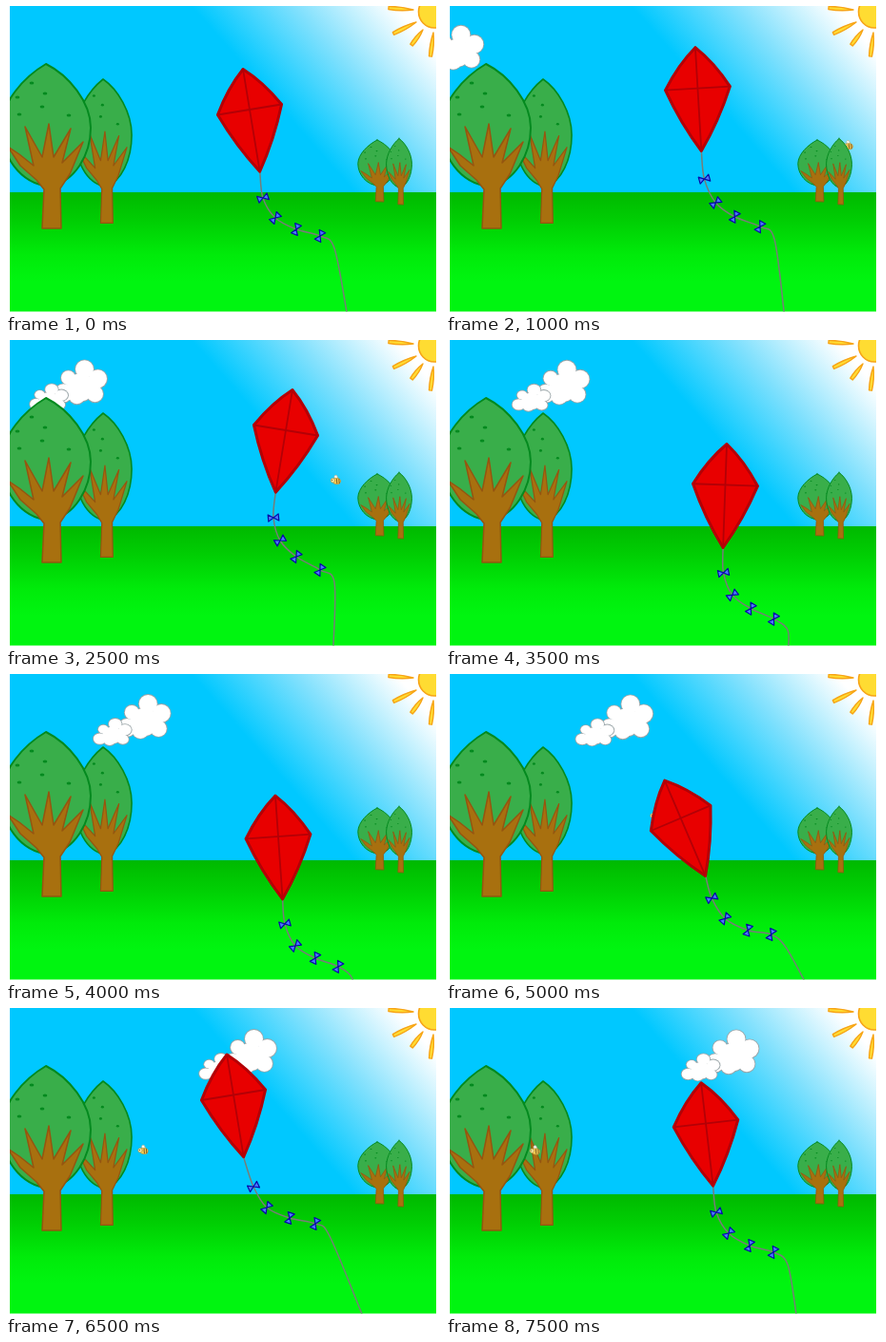
These frames come from a looping animation (456 px wide and 322 px high, 8 s). An HTML page with a canvas:

```html
<!DOCTYPE html>
<html lang="en">
<head>
<meta charset="utf-8">
<title>Kite</title>
<style>
html, body { margin: 0; width: 100%; height: 100%; overflow: hidden; background: #fff; }
canvas { display: block; }
</style>
</head>
<body>
<canvas id="stage" width="456" height="322"></canvas>
<script>
const ctx = document.getElementById('stage').getContext('2d');
const LOOP = 8000, STEP = 500, TAU = Math.PI * 2;

// time, centre x, centre y, tilt in degrees, four bows (x, y), x of the string end
const POSES = [
  [0, 256, 109, -9.3, 270, 202, 283, 223, 305, 235, 330, 242, 358],
  [1.5, 270.5, 80, 0, 273, 176, 284, 202, 303, 218, 330, 230, 353],
  [2.5, 294, 95, 9.3, 281, 187, 288, 211, 305, 228, 330, 242, 344],
  [4, 286, 171, -4, 293, 263, 304, 286, 325, 299, 349, 308, 366],
  [5.5, 230.4, 133.5, -28.5, 271, 216, 286, 237, 311, 249, 336, 252, 379],
  [6.5, 239, 91.5, -9.3, 260, 188, 274, 210, 298, 221, 325, 227, 374],
  [7.5, 273, 121.5, -6.6, 284, 215, 297, 237, 319, 250, 344, 257, 368]
];

// smooth curve through the poses
function poseAt(t) {
  const last = POSES.length - 1;
  let i = 0;
  while (i < last - 1 && t >= POSES[i + 1][0]) i++;
  const a = POSES[i], b = POSES[i + 1];
  const before = POSES[Math.max(i - 1, 0)], after = POSES[Math.min(i + 2, last)];
  const span = b[0] - a[0], u = (t - a[0]) / span;
  return a.map((v, k) => {
    const m0 = (b[k] - before[k]) / (b[0] - before[0]) * span;
    const m1 = (after[k] - v) / (after[0] - a[0]) * span;
    const w = u * u * (3 - 2 * u);
    return v * (1 - w) + b[k] * w + m0 * u * (1 - u) ** 2 - m1 * u * u * (1 - u);
  });
}

function paint(fill, stroke, width) {
  if (fill) { ctx.fillStyle = fill; ctx.fill(); }
  if (stroke) { ctx.strokeStyle = stroke; ctx.lineWidth = width; ctx.stroke(); }
}

function poly(points, closed = true) {
  ctx.beginPath();
  points.forEach(([x, y]) => ctx.lineTo(x, y));
  if (closed) ctx.closePath();
}

function oval(x, y, rx, ry = rx, turn = 0) {
  ctx.beginPath();
  ctx.ellipse(x, y, rx, ry, turn, 0, TAU);
}

function fade(x0, y0, x1, y1, stops) {
  const g = ctx.createLinearGradient(x0, y0, x1, y1);
  stops.forEach(([p, c]) => g.addColorStop(p, c));
  return g;
}

function backdrop() {
  ctx.fillStyle = fade(195, 0, 316, -106, [[0, '#00c8ff'], [0.5, '#7fe0fd'], [1, '#fff']]);
  ctx.fillRect(0, 0, 456, 197);
  ctx.fillStyle = fade(0, 196, 0, 290, [[0, '#00b900'], [0.3, '#00cd03'], [0.7, '#00eb0a'], [1, '#00f510']]);
  ctx.fillRect(0, 196, 456, 126);
}

function sun() {
  const edge = '#f7a416', fill = '#ffdc32';
  const rays = [[402, 2, 428, 4], [407, 29, 431, 17], [426, 41, 438, 25], [446, 53, 449, 28]];
  for (const [x0, y0, x1, y1] of rays) {
    const len = Math.hypot(x1 - x0, y1 - y0);
    ctx.save();
    ctx.translate(x0, y0);
    ctx.rotate(Math.atan2(y1 - y0, x1 - x0));
    ctx.beginPath();
    ctx.moveTo(0, -1.5);
    ctx.quadraticCurveTo(len * 0.5, -2.6, len, 0);
    ctx.quadraticCurveTo(len * 0.5, 2.8, 0, 1.5);
    ctx.closePath();
    paint(fill, edge, 1.4);
    ctx.restore();
  }
  oval(450, 6, 16.5, 17);
  paint(fill, edge, 1.6);
}

const PUFFS = [[-24, 10, 10], [-10, 20, 10], [-13, 36, 9], [-28, 29, 15], [-41, 19, 8], [-46, 35, 10], [-32, 38, 9]];

function cloud(x, y, sx, sy) {
  const trace = grow => PUFFS.forEach(([px, py, r]) => {
    oval(x + px * sx, y + py * sy, r * sx + grow, r * sy + grow);
    ctx.fill();
  });
  ctx.fillStyle = '#9aa5a8';
  trace(0.4);
  ctx.fillStyle = '#fff';
  trace(-0.5);
}

const BRANCHES = [
  [-4, 173], [-2, 132], [-10, 122], [-27, 107], [-40, 87], [-28, 95], [-13, 107],
  [-22, 66], [-4, 98], [3, 63], [8, 98], [26, 68], [17, 104], [39, 82],
  [25, 116], [15, 131], [16, 173]
];
const SPOTS = [[-15, 20], [-1, 31], [-30, 35], [-4, 45], [-28, 53], [24, 54]];

function tree(x, y, sx, sy, line) {
  const scaled = draw => {
    ctx.save();
    ctx.translate(x, y);
    ctx.scale(sx, sy);
    draw();
    ctx.restore();
  };
  scaled(() => {
    ctx.beginPath();
    ctx.moveTo(0, 0);
    ctx.bezierCurveTo(24, 12, 47, 40, 47, 67);
    ctx.bezierCurveTo(47, 96, 30, 124, 4, 129);
    ctx.bezierCurveTo(-28, 126, -47, 96, -47, 66);
    ctx.bezierCurveTo(-46, 40, -24, 14, 0, 0);
    ctx.closePath();
  });
  paint('#39ae4a', '#048a1f', line);
  SPOTS.forEach(([px, py]) => {
    oval(x + px * sx, y + py * sy, 2.4 * sx, 1.5 * sy);
    paint('#048a1f');
  });
  scaled(() => poly(BRANCHES));
  paint('#a8700f', '#955510', line * 0.75);
}

function bee(x, y) {
  ctx.save();
  ctx.translate(x, y);
  oval(0.5, -2.5, 1.8, 3, -0.3);
  paint('#f4f8f4', '#a9aa83', 0.6);
  oval(1, 1, 4.2, 3.2, 0.1);
  paint('#f7cf52', '#b58a37', 0.6);
  for (const s of [1, 3.4]) {
    poly([[s, -1.3], [s + 0.4, 3.2]], false);
    paint(null, '#6b4b22', 0.9);
  }
  oval(-3, 0.3, 2.2);
  paint('#fbe9a0', '#b58a37', 0.6);
  oval(-3.6, 0, 0.6);
  paint('#4b3b20');
  ctx.restore();
}

function bow(x, y, angle) {
  ctx.save();
  ctx.translate(x, y);
  ctx.rotate(angle);
  for (const side of [-1, 1]) {
    poly([[0, 0], [5.5 * side, -3.6], [5.5 * side, 3.6]]);
    paint('#4a78ff', '#0808a8', 1.2);
  }
  ctx.restore();
}

function kite(pose) {
  const [, cx, cy, tilt, ...rest] = pose;
  const a = tilt * Math.PI / 180;
  const bows = [0, 2, 4, 6].map(i => [rest[i], rest[i + 1]]);
  const bend = [bows[3][0] + 15, bows[3][1] + 13];
  const tail = [
    [cx - 67 * Math.sin(a), cy + 67 * Math.cos(a)], ...bows, bend,
    [rest[8], Math.max(322, bend[1] + 30)]
  ];

  ctx.beginPath();
  ctx.moveTo(...tail[0]);
  for (let i = 0; i < tail.length - 1; i++) {
    const p = tail[Math.max(i - 1, 0)], q = tail[i], r = tail[i + 1];
    const s = tail[Math.min(i + 2, tail.length - 1)];
    ctx.bezierCurveTo(q[0] + (r[0] - p[0]) / 6, q[1] + (r[1] - p[1]) / 6,
      r[0] - (s[0] - q[0]) / 6, r[1] - (s[1] - q[1]) / 6, r[0], r[1]);
  }
  paint(null, '#777d78', 1.5);
  bows.forEach(([x, y], i) => {
    const p = tail[i], n = tail[i + 2];
    bow(x, y, Math.atan2(n[1] - p[1], n[0] - p[0]) - Math.PI / 2);
  });

  ctx.save();
  ctx.translate(cx, cy);
  ctx.rotate(a);
  const dark = '#b40006';
  ctx.beginPath();
  ctx.moveTo(0, -43);
  ctx.quadraticCurveTo(19, -26, 34, 0);
  ctx.quadraticCurveTo(20, 36, 0, 66);
  ctx.quadraticCurveTo(-20, 36, -34, 0);
  ctx.quadraticCurveTo(-19, -26, 0, -43);
  ctx.closePath();
  paint('#e80000', dark, 3);
  poly([[0, -43], [0, 66]], false);
  paint(null, dark, 1.8);
  poly([[-34, 0], [34, 0]], false);
  paint(null, dark, 1.8);
  ctx.restore();
}

function draw(t) {
  ctx.fillStyle = '#fff';
  ctx.fillRect(0, 0, 456, 322);
  ctx.save();
  ctx.beginPath();
  ctx.rect(4, 0, 448, 321.5);
  ctx.clip();
  ctx.lineJoin = ctx.lineCap = 'round';

  backdrop();
  sun();
  const x = 62 + 44.5 * (t - 1.5), y = 19.8 + 0.4 * t;
  cloud(x, y, 1, 1);
  cloud(x - 41, y + 25, 0.73, 0.62);
  tree(102, 77, 0.64, 0.875, 1.6);
  tree(390, 141, 0.43, 0.374, 1);
  bee(397 - 50.6 * (t - 1.5), 147 + 0.5 * (t - 1.5));
  tree(413, 139.5, 0.285, 0.4, 1);
  tree(42, 61, 1, 1, 2);
  kite(poseAt(t));
  ctx.restore();
}

function tick(now) {
  draw(Math.floor((now % LOOP) / STEP) * STEP / 1000);
  requestAnimationFrame(tick);
}
draw(0);
requestAnimationFrame(tick);
</script>
</body>
</html>
```
